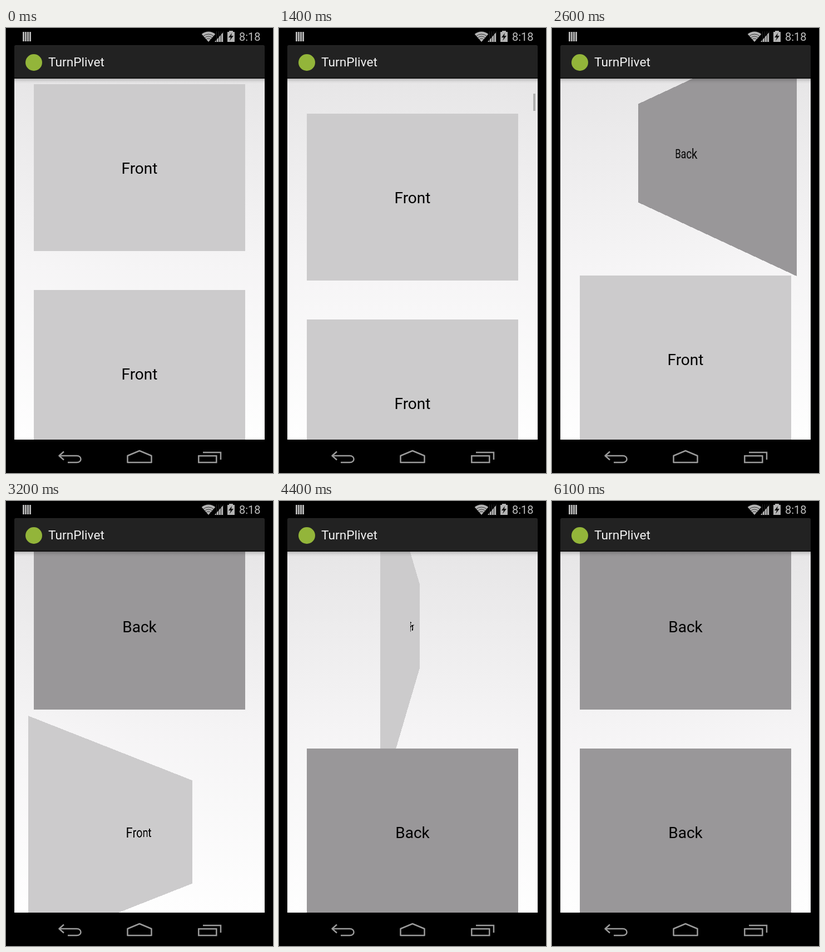
Recreate the animation shown at these times as an HTML page with a canvas. Size 480 by 800 pixels, loop 6200 ms.

```html
<!DOCTYPE html>
<html lang="en">
<head>
<meta charset="utf-8">
<title>Flipping cards</title>
<style>
  html, body { margin: 0; width: 100%; height: 100%; overflow: hidden; background: #000; }
  body { font-family: Roboto, "Open Sans", sans-serif; }
  #stage { position: absolute; left: 0; top: 0; width: 480px; height: 800px; overflow: hidden; }
  #stage > * { position: absolute; }
  #list { left: 40px; top: 91px; width: 400px; height: 649px; overflow: hidden; }
  .card {
    position: absolute; left: 10px; width: 380px; height: 300px;
    font-size: 28px; line-height: 303px; text-align: center; color: #000;
    background: #cccbcc;
  }
  .card.back { background: #999799; }
  #shade {
    left: 15px; top: 91px; width: 450px; height: 9px;
    background: linear-gradient(rgba(0, 0, 0, .2), rgba(0, 0, 0, .05) 55%, transparent);
  }
  #thumb { left: 457px; width: 4px; height: 31px; background: #afafaf; }
  #title { left: 76px; top: 47px; font-size: 22.7px; line-height: 30px; color: #f3f3f3; }
  #clock { left: 419px; top: 4px; font-size: 20px; line-height: 24px; color: #bebebe; }
</style>
</head>
<body>
<div id="stage">
  <canvas id="chrome" width="480" height="800"></canvas>
  <div id="list"></div>
  <div id="shade"></div>
  <div id="thumb"></div>
  <div id="title">TurnPlivet</div>
  <div id="clock">8:18</div>
</div>
<script>
const LOOP = 6200, STEP = 100;
const LIST_TOP = 91, FIRST = 10, PITCH = 370, SCROLL = 396;
const FLIP_MS = 720, EYE = 240, DEPTH = 62.5;
const flips = [
  { item: 1, start: 2224, dir: 1 },
  { item: 2, start: 3124, dir: 1 },
  { item: 1, start: 4165, dir: -1 },
  { item: 1, start: 5265, dir: 1 }
];

const clamp = v => Math.min(1, Math.max(0, v));
const smooth = v => v * v * (3 - 2 * v);
const decelerate = v => 1 - (1 - v) ** 2;

const list = document.getElementById('list');
const thumb = document.getElementById('thumb');
const cards = [0, 1, 2].map(() => {
  const card = document.createElement('div');
  card.className = 'card';
  return list.appendChild(card);
});

function drawChrome() {
  const g = document.getElementById('chrome').getContext('2d');
  const rect = (color, x, y, w, h) => {
    g.fillStyle = color;
    g.fillRect(x, y, w, h);
  };
  const path = (points, closed) => {
    g.beginPath();
    points.forEach(([x, y]) => g.lineTo(x, y));
    if (closed) g.closePath();
  };

  rect('#000', 0, 0, 480, 800);
  const paper = g.createLinearGradient(0, 91, 0, 740);
  paper.addColorStop(0, '#e7e6e7');
  paper.addColorStop(.5, '#f5f4f5');
  paper.addColorStop(1, '#fefefe');
  rect(paper, 15, 91, 450, 649);

  // Action bar
  g.fillStyle = '#222';
  g.beginPath();
  g.roundRect(15, 31, 450, 60, [2, 2, 0, 0]);
  g.fill();
  rect('#2c2c2c', 17, 31, 446, 1);
  rect('#121212', 15, 89, 450, 2);
  g.fillStyle = '#93b53a';
  g.beginPath();
  g.arc(50, 62, 15, 0, 2 * Math.PI);
  g.fill();

  // Status icons
  const tone = '#b4b4b4';
  for (let i = 0; i < 4; i++) rect(tone, 30 + i * 4, 7, 3, 17);

  g.fillStyle = tone;
  g.beginPath();
  g.moveTo(364, 25);
  g.arc(364, 25, 18.5, -Math.PI * .73, -Math.PI * .27);
  g.fill();
  g.strokeStyle = '#333';
  g.lineWidth = 1;
  for (const r of [6, 10, 14]) {
    g.beginPath();
    g.arc(364, 25, r, -Math.PI * .75, -Math.PI * .25);
    g.stroke();
  }

  g.fillStyle = tone;
  path([[375, 25], [391, 25], [391, 7]], true);
  g.fill();
  for (let x = 378; x < 391; x += 4) rect('#222', x, 6, 1, 20);

  rect(tone, 401, 5, 7, 3);
  rect(tone, 398, 7, 13, 18);
  g.fillStyle = '#111';
  path([[406, 9], [400, 17], [404, 17], [402, 23], [409, 14], [405, 14]], true);
  g.fill();

  // Navigation icons
  g.strokeStyle = '#9b9b9b';
  g.lineWidth = 2.5;
  g.lineJoin = 'round';
  path([[104, 761.5], [95.5, 769], [104, 776.5]]);
  g.stroke();
  g.beginPath();
  g.moveTo(96, 769);
  g.lineTo(127, 769);
  g.bezierCurveTo(137, 769, 137, 781, 127, 781);
  g.lineTo(111, 781);
  g.stroke();
  path([[218.5, 769], [240, 760], [261.5, 769], [261.5, 781], [218.5, 781]], true);
  g.stroke();
  g.lineJoin = 'miter';
  g.strokeRect(346.3, 769.2, 32, 11.8);
  path([[354, 763], [386, 763], [386, 776]]);
  g.stroke();
}

function pose(item, t) {
  let back = false, angle = 0, depth = 0;
  for (const f of flips) {
    if (f.item !== item || t < f.start) continue;
    const p = decelerate(clamp((t - f.start) / FLIP_MS));
    const past = p >= .5;
    if (past) back = !back;
    angle = f.dir * 180 * (past ? p - 1 : p);
    depth = DEPTH * Math.sin(Math.PI * p);
  }
  return { back, angle, depth };
}

function render(t) {
  const scroll = Math.round(SCROLL * smooth(clamp((t - 450) / 1333)));
  cards.forEach((card, i) => {
    const { back, angle, depth } = pose(i, t);
    card.style.top = FIRST + i * PITCH - scroll + 'px';
    card.classList.toggle('back', back);
    card.textContent = back ? 'Back' : 'Front';
    card.style.transform = Math.abs(angle) < .01 ? 'none' :
      `perspective(${EYE}px) translateZ(${-depth}px) rotateY(${angle}deg)`;
  });
  thumb.style.top = LIST_TOP + 4 + scroll * .072 + 'px';
  thumb.style.opacity = t < 400 ? 0 : 1 - clamp((t - 1950) / 250);
}

function tick() {
  const t = performance.now() % LOOP;
  render(Math.floor(t / STEP) * STEP);
  requestAnimationFrame(tick);
}

drawChrome();
tick();
</script>
</body>
</html>
```
